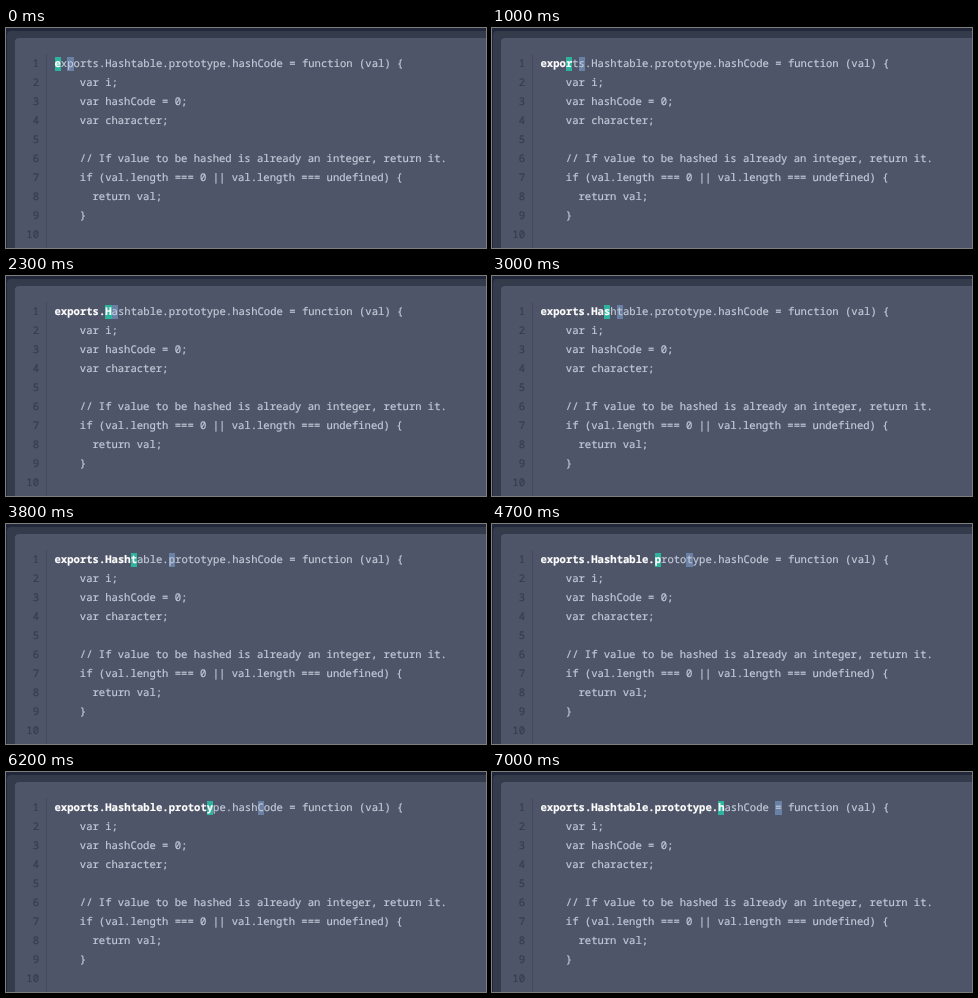
Write an HTML page that moves like this. It is 480 by 220 pixels and loops after 7100 ms.

```html
<!DOCTYPE html>
<html lang="en">
<head>
<meta charset="utf-8">
<title>Typing race</title>
<style>
  html, body { margin: 0; width: 100%; height: 100%; overflow: hidden; background: #22283a; }
  .frame { position: absolute; inset: 3px 0 0 1px; background: #343b4a; border-radius: 4px 0 0 0; }
  .panel { position: absolute; inset: 10px 0 0 9px; background: #4f5568; border-radius: 4px 0 0 0; }
  .gutter { position: absolute; inset: 26px auto 0 40px; width: 1px; background: #434a5c; }
  pre {
    position: absolute; top: 27px; margin: 0;
    font: 500 10.55px/19px "Noto Sans Mono", monospace;
    text-rendering: geometricPrecision;
    font-kerning: none; font-variant-ligatures: none;
    -webkit-text-stroke: 0.2px;
  }
  .numbers { right: calc(100% - 33px); text-align: right; color: #363d4f; }
  .code { left: 48.5px; color: #c2cbda; }
  .typed, .player { color: #fff; font-weight: 700; }
  .player { background: #2eb49e; }
  .opponent { background: #6a80a4; }
</style>
</head>
<body>
<div class="frame"></div>
<div class="panel"></div>
<div class="gutter"></div>
<pre class="numbers">1
2
3
4
5
6
7
8
9
10</pre>
<pre class="code"><span id="race">exports.Hashtable.prototype.hashCode = function (val) {</span>
    var i;
    var hashCode = 0;
    var character;

    // If value to be hashed is already an integer, return it.
    if (val.length === 0 || val.length === undefined) {
      return val;
    }
</pre>
<script>
  const LOOP = 7100;
  const TICK = 100;

  // [time in ms, column]: steady typing between the points, pauses where the column repeats.
  const playerPath = [[0, 0], [800, 2], [1000, 4], [1600, 6], [2000, 8], [2600, 8], [3000, 10],
    [3900, 13], [4200, 16], [4700, 18], [5500, 21], [5700, 21], [6000, 24], [6900, 28], [LOOP, 28]];
  const opponentPath = [[0, 2], [1000, 6], [1700, 11], [1900, 11], [2500, 9], [3000, 12],
    [3900, 19], [4700, 23], [4900, 23], [5500, 28], [5700, 28], [6000, 31], [7000, 37], [LOOP, 37]];

  const race = document.getElementById("race");
  const cells = [...race.textContent].map(char => {
    const cell = document.createElement("span");
    cell.textContent = char;
    return cell;
  });
  race.replaceChildren(...cells);

  function columnAt(path, time) {
    const next = path.findIndex(([end]) => end > time);
    const [startTime, startColumn] = path[next - 1];
    const [endTime, endColumn] = path[next];
    const progress = (time - startTime) / (endTime - startTime);
    return Math.floor(startColumn + (endColumn - startColumn) * progress + 1e-6);
  }

  function draw() {
    const elapsed = performance.now() % LOOP;
    const time = elapsed - elapsed % TICK;
    const player = columnAt(playerPath, time);
    const opponent = columnAt(opponentPath, time);
    cells.forEach((cell, column) => {
      cell.className = column < player ? "typed"
        : column === player ? "player"
        : column === opponent ? "opponent" : "";
    });
    requestAnimationFrame(draw);
  }

  draw();
</script>
</body>
</html>
```
